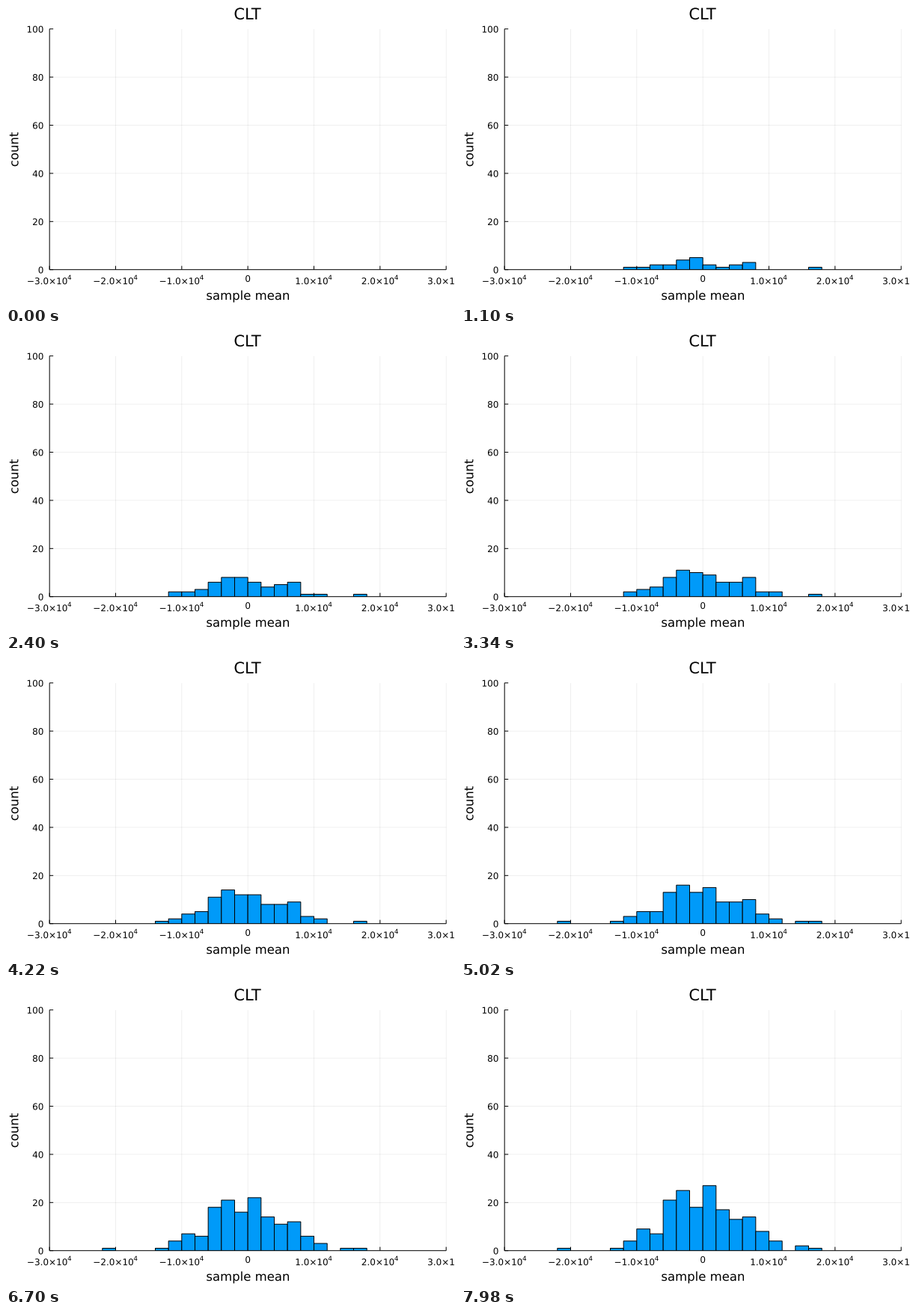
A matplotlib script that plays this animation: 600x400 px, repeating every 8 s.

```python
import matplotlib.pyplot as plt
from matplotlib.animation import FuncAnimation
from matplotlib.patches import PathPatch, Rectangle
from matplotlib.path import Path
from matplotlib.textpath import TextPath
from matplotlib.transforms import Affine2D, Bbox

plt.rcParams["font.family"] = "DejaVu Sans"

W, H, DPI = 600, 400, 100
PT = 72 / DPI                      # points per pixel
X0, X1, Y0, Y1 = 58.17, 588.17, 352.7, 30.7
XMID, YMID = (X0 + X1) / 2, (Y0 + Y1) / 2
TICK = 5
SMALL, MEDIUM, LARGE = 12, 16.5, 21   # text sizes in pixels

# Left bin edge in thousands: (final count, pace); a high pace fills early
BINS = {
    -22: (1, .77), -14: (1, 1.1), -12: (4, 1.3), -10: (9, .75),
    -8: (7, 1.8), -6: (21, .95), -4: (25, 1.05), -2: (18, 1.5),
    0: (27, .8), 2: (17, .8), 4: (13, 1.2), 6: (14, 1.4),
    8: (8, .7), 10: (4, .9), 14: (2, .4), 16: (1, 4.4),
}


def px(v):
    return X0 + (v + 30) / 60 * (X1 - X0)


def py(count):
    return Y0 + count / 100 * (Y1 - Y0)


def arrival_order():
    # One sample per step, ordered by each bin's own growth curve
    times = [(((k + .5) / n) ** pace, b)
             for b, (n, pace) in BINS.items() for k in range(n)]
    return [b for _, b in sorted(times)]


fig = plt.figure(figsize=(W / DPI, H / DPI), dpi=DPI, facecolor="white")
ax = fig.add_axes([0, 0, 1, 1])
ax.set_xlim(0, W)
ax.set_ylim(H, 0)
ax.axis("off")
plot_box = Bbox([[round(X0), H - round(Y0)], [round(X1) + 1, H - round(Y1)]])


def line(xs, ys):
    ax.plot(xs, ys, color="black", lw=PT, zorder=2,
            solid_capstyle="butt", snap=False)


def grid(xs, ys):
    ax.plot(xs, ys, color="black", lw=.6 * PT, alpha=.1, zorder=1,
            snap=False)[0].set_clip_box(plot_box)


def glyphs(s, size):
    # Outline with its ink starting at x = 0 and its baseline at y = 0
    path = TextPath((0, 0), s, size=size)
    return path.transformed(
        Affine2D().translate(-path.get_extents().x0, 0).scale(1, -1))


def put(path, x, y, align=.5, angle=0):
    shift = -align * path.get_extents().x1
    move = Affine2D().translate(shift, 0).rotate_deg(angle).translate(x, y)
    ax.add_patch(PathPatch(path.transformed(move), facecolor="black", lw=0,
                           snap=False, zorder=4))


def power_label(v):
    sign = "\u2212" if v < 0 else ""
    base = glyphs(f"{sign}{abs(v) / 10:.1f}\u00d710", SMALL)
    power = glyphs("4", .73 * SMALL).transformed(
        Affine2D().translate(base.get_extents().x1 + .9, -6))
    return Path.make_compound_path(base, power)


for v in range(-30, 31, 10):
    x = px(v)
    grid([x, x], [Y0, Y1])
    line([x, x], [Y0, Y0 - TICK])
    if v:
        put(power_label(v), x, 372.2)
    else:
        put(glyphs("0", SMALL), x, 369)

for c in range(0, 101, 20):
    y = py(c)
    grid([X0, X1], [y, y])
    line([X0, X0 + TICK], [y, y])
    put(glyphs(str(c), SMALL), 49.6, y + 4.8, align=1)

line([X0, X1], [Y0, Y0])
line([X0, X0], [Y0, Y1])

put(glyphs("CLT", LARGE), XMID, 17.9)
put(glyphs("sample mean", MEDIUM), XMID, 393)
put(glyphs("count", MEDIUM), 16.4, YMID, angle=-90)

bars = {}
for b in BINS:
    bar = Rectangle((px(b), Y0), px(b + 2) - px(b), 0, facecolor="#009af9",
                    edgecolor="black", lw=PT, zorder=3, visible=False)
    bar.set_snap(False)
    bars[b] = ax.add_patch(bar)
    bar.set_clip_box(plot_box)

SAMPLES = arrival_order()


def step_at(ms):
    # Three steps every 140 ms, lasting 20, 100 and 20 ms
    cycle, r = divmod(ms, 140)
    return 3 * cycle + (r >= 20) + (r >= 120)


def draw(n):
    step = step_at(n * 20)
    seen = SAMPLES[:step + 1] if step else []
    for b, bar in bars.items():
        count = seen.count(b)
        bar.set_height(py(count) - Y0)
        bar.set_visible(count > 0)
    return list(bars.values())


anim = FuncAnimation(fig, draw, frames=400, interval=20, repeat=True,
                     repeat_delay=0, blit=False)
plt.show()
```
